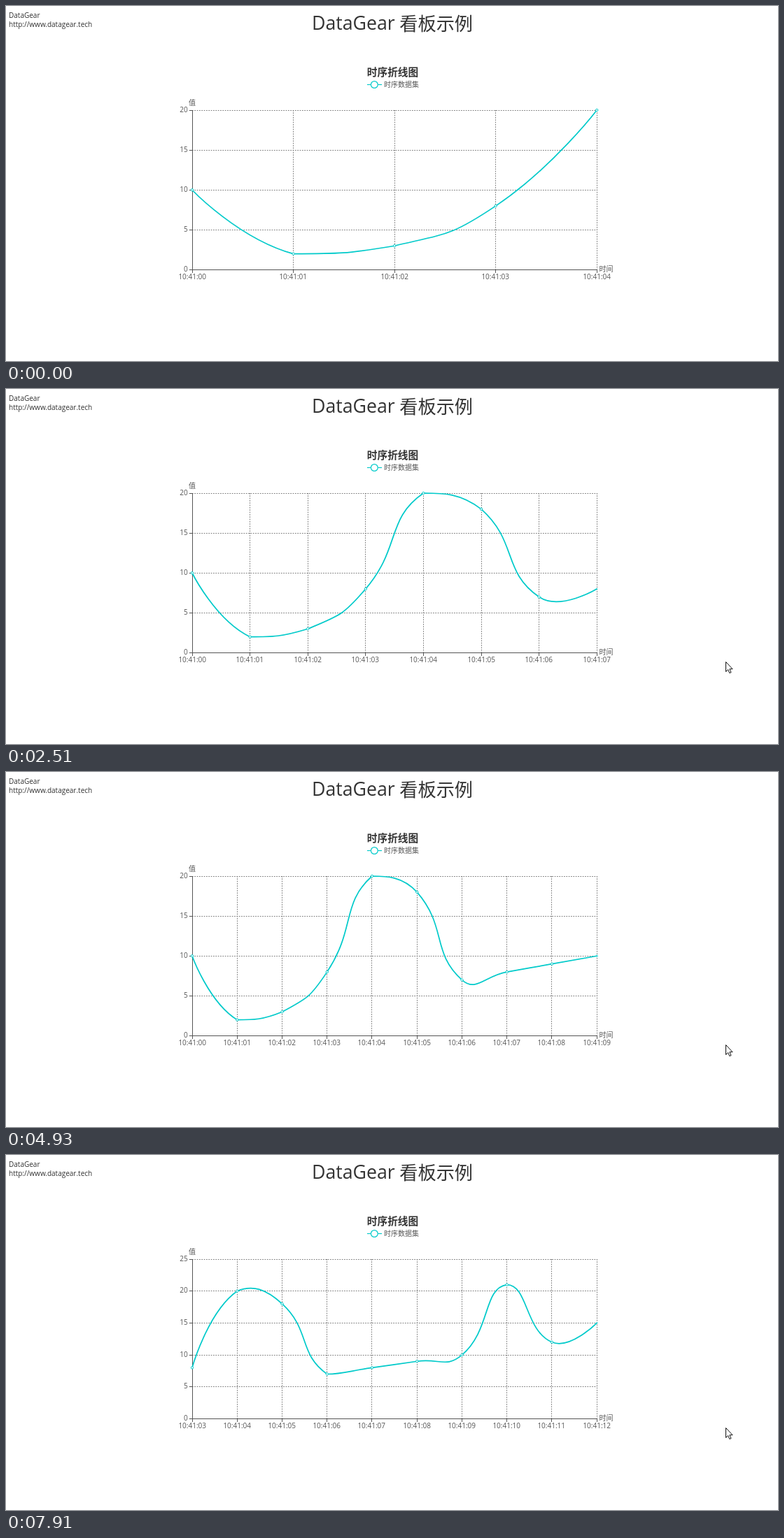
Recreate the animation shown at these times as an HTML page. Size 1103x508 px, loop 7990 ms.

```html
<!DOCTYPE html>
<html lang="zh-CN">
<head>
<meta charset="utf-8">
<style>
  html, body { margin: 0; width: 100%; height: 100%; overflow: hidden; background: #fff; }
  svg { display: block; font: 10px "Open Sans", "Noto Sans CJK SC", "Noto Sans CJK", sans-serif; fill: #555; }
  .dark { fill: #333; }
  .axis { stroke: #555; }
  .split { stroke: #777; stroke-dasharray: 1.67; }
  .curve { fill: none; stroke: #00caca; stroke-width: 1.7; stroke-linejoin: bevel; }
  .dot { fill: #fff; stroke: #00caca; }
  .mid { text-anchor: middle; }
  .end { text-anchor: end; }
</style>
</head>
<body>
<svg width="1103" height="508" viewBox="0 0 1103 508">
  <clipPath id="plot"><rect x="265" y="148" width="580" height="231"/></clipPath>
  <g class="dark">
    <text x="4" y="16.5">DataGear</text>
    <text x="4" y="29.5">http://www.datagear.tech</text>
    <text x="437" y="34" font-size="26.7">DataGear</text>
    <text x="562.3" y="34.5" font-size="26.2">看板示例</text>
    <text class="mid" x="552.5" y="99.5" font-size="14.7" font-weight="bold">时序折线图</text>
  </g>
  <path class="curve" d="M516 112.5H537" style="stroke-width:1.2"/>
  <circle class="dot" cx="526.3" cy="112.5" r="4.9" stroke-width="1.2"/>
  <text x="540" y="115.5">时序数据集</text>
  <text class="mid" x="266" y="142">值</text>
  <text x="847.5" y="380.3">时间</text>
  <g id="chart"></g>
  <path id="cursor" d="M0 0V14L3.2 11L5.3 16L7.5 15L5.4 10.2H9.6Z" fill="#fff" stroke="#111"/>
</svg>
<script>
const LOOP = 7990, START = 70, PERIOD = 1051, MOVE = 300, GROW = 1000;
const LEFT = 266, WIDTH = 578.2, TOP = 149, BOTTOM = 377.5;
const values = [10, 2, 3, 8, 20, 18, 7, 8, 9, 10, 21, 12, 15];
const chart = document.getElementById('chart');
const cursor = document.getElementById('cursor');

const clamp = (v, lo, hi) => Math.min(hi, Math.max(lo, v));
const mix = (a, b, p) => a + (b - a) * p;
const snap = v => Math.floor(v) + 0.5;
const easeOut = p => 1 - (1 - clamp(p, 0, 1)) ** 3;
const line = (cls, x1, y1, x2, y2) => `<path class="${cls}" d="M${x1} ${y1}L${x2} ${y2}"/>`;
const text = (cls, x, y, s) => `<text class="${cls}" x="${x}" y="${y}">${s}</text>`;
const dot = (x, y, scale) => scale > 0.02 ? `<circle class="dot" cx="${x}" cy="${y}" r="${1.67 * scale}"/>` : '';

// Window of at most ten points ending at index `last`
function view(last) {
  const first = Math.max(0, last - 9), steps = last - first, max = last < 10 ? 20 : 25;
  return {
    first, steps, max,
    x: slot => LEFT + WIDTH * slot / steps,
    y: v => BOTTOM - (BOTTOM - TOP) * v / max
  };
}

// Smooth curve whose control points stay inside the bounds of all points
function smoothPath(pts) {
  const bounds = [0, 1].map(a => {
    const c = pts.map(p => p[a]);
    return [Math.min(...c), Math.max(...c)];
  });
  const inside = p => p.map((v, a) => clamp(v, ...bounds[a]));
  const dist = (a, b) => Math.hypot(a[0] - b[0], a[1] - b[1]);
  let d = 'M' + pts[0], c0 = pts[0];
  for (let i = 1; i < pts.length; i++) {
    const p = pts[i], prev = pts[i - 1], next = pts[i + 1];
    let c1 = p, c2 = p;
    if (next) {
      const before = dist(p, prev), after = dist(p, next);
      const ratio = after / (before + after || 1);
      const shift = f => p.map((v, a) => v + (next[a] - prev[a]) * f / 2);
      c1 = shift(ratio - 1);
      c2 = shift(ratio);
    }
    d += `C${inside(c0)} ${inside(c1)} ${p}`;
    c0 = c2;
  }
  return d;
}

function drawChart(t) {
  const count = Math.floor((t - START) / PERIOD) + 1;
  const age = count ? t - START - (count - 1) * PERIOD : GROW;
  const p = easeOut(age / MOVE);
  const last = 4 + count;
  const now = view(last), old = count ? view(last - 1) : now;
  let out = '';

  for (let v = 0; v <= now.max; v += 5) {
    const from = v > old.max ? now : old;
    const y = mix(snap(from.y(v)), snap(now.y(v)), p);
    if (v) out += line('split', LEFT, y, LEFT + WIDTH, y);
    out += line('axis', LEFT - 4.2, y, LEFT, y) + text('end', 259.7, y + 2.4, v);
  }
  for (let i = 0; i <= now.steps; i++) {
    const from = i > old.steps ? now : old;
    const x = mix(snap(from.x(i)), snap(now.x(i)), p);
    if (i) out += line('split', x, TOP, x, BOTTOM);
    out += line('axis', x, 377.5, x, 382) +
      text('mid', x - 0.3, 391, '10:41:' + String(now.first + i).padStart(2, '0'));
  }
  out += line('axis', 266.5, TOP, 266.5, 378) + line('axis', LEFT, 377.5, LEFT + WIDTH, 377.5);

  const pts = [];
  for (let i = now.first; i <= last; i++) {
    const slot = i - now.first;
    const oldSlot = i === last ? slot : i - old.first;
    pts.push([
      mix(old.x(oldSlot), now.x(slot), p),
      mix(old.y(values[i]), now.y(values[i]), p)
    ]);
  }
  out += `<path class="curve" clip-path="url(#plot)" d="${smoothPath(pts)}"/>`;
  pts.forEach(([x, y], i) => {
    out += dot(x, y, i === now.steps ? Math.min(1, age / GROW) : 1);
  });
  if (now.first > old.first) out += dot(LEFT, old.y(values[old.first]), 1 - p);
  chart.innerHTML = out;
}

function drawCursor(t) {
  const p = easeOut((t - 300) / 320);
  cursor.setAttribute('visibility', t < 300 ? 'hidden' : 'visible');
  cursor.setAttribute('transform', `translate(${mix(1032.5, 1028.5, p)} ${mix(448.5, 390.5, p)})`);
}

const begin = performance.now();
function frame() {
  const t = (performance.now() - begin) % LOOP;
  drawChart(t);
  drawCursor(t);
  requestAnimationFrame(frame);
}
frame();
</script>
</body>
</html>
```
